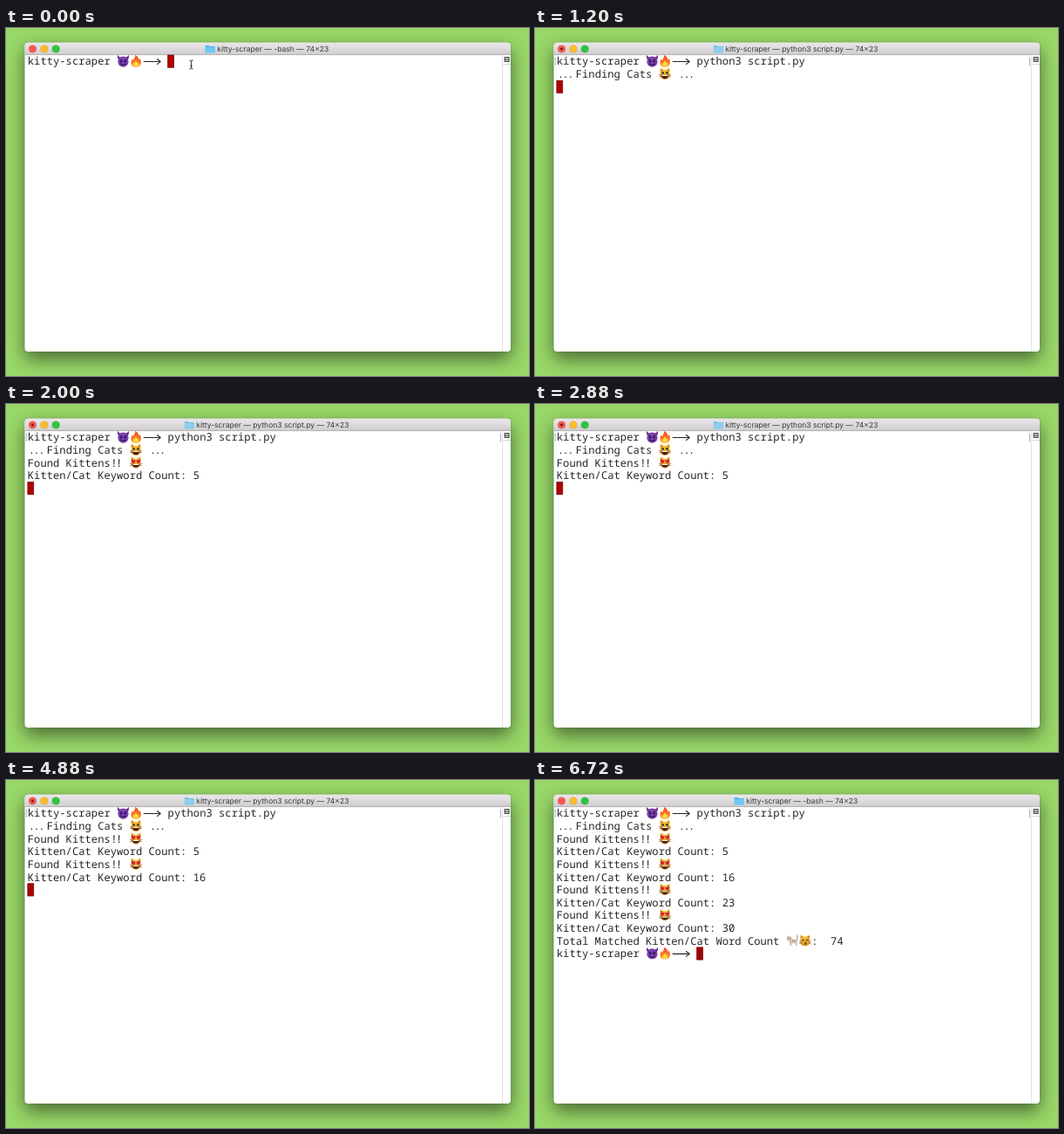
An HTML page that plays this animation: 600 px wide and 399 px high, repeating every 6.76 s.

```html
<!DOCTYPE html>
<html lang="en">
<head>
<meta charset="utf-8">
<title>Terminal session</title>
<style>
  html, body { margin: 0; width: 100%; height: 100%; overflow: hidden; background: #98d768; }
  svg { display: block; width: 100vw; height: 100vh; }
  text { white-space: pre; text-rendering: geometricPrecision; }
  .mono { font: 500 12.18px "Noto Sans Mono", "DejaVu Sans Mono", monospace; fill: #262626; }
  .tight { letter-spacing: -1.6px; }
  .title { font: 8.55px Inter, Roboto, sans-serif; fill: #3a3a3a; }
  .window { filter: drop-shadow(0 8px 10px rgba(0, 0, 0, .45)) drop-shadow(0 0 1px rgba(0, 0, 0, .2)); }
</style>
</head>
<body>
<svg id="stage" viewBox="0 0 600 399" xmlns="http://www.w3.org/2000/svg">
  <defs>
    <linearGradient id="bar" x2="0" y2="1">
      <stop stop-color="#e9e7e9"/><stop offset="1" stop-color="#cfcdcf"/>
    </linearGradient>
    <linearGradient id="flame" x2="0" y2="1">
      <stop stop-color="#f0482b"/><stop offset="1" stop-color="#ff9a1f"/>
    </linearGradient>
    <linearGradient id="fur" x2="0" y2="1">
      <stop stop-color="#f8cc45"/><stop offset="1" stop-color="#d98f1e"/>
    </linearGradient>

    <symbol id="imp" viewBox="0 0 16 16">
      <path d="M1 .7Q.2 5 3 7.2L6 4Q2.5 3.5 1 .7M15 .7Q15.8 5 13 7.2L10 4Q13.5 3.5 15 .7" fill="#5b2a86"/>
      <circle cx="8" cy="9" r="6.7" fill="#7b3fae"/>
      <path d="M3.6 6.3L7 8.2M12.4 6.3L9 8.2" stroke="#2d1147" stroke-width="1.1"/>
      <circle cx="5.5" cy="8.7" r="1.2" fill="#2d1147"/>
      <circle cx="10.5" cy="8.7" r="1.2" fill="#2d1147"/>
      <path d="M4.2 11.3Q8 14.8 11.8 11.3" fill="none" stroke="#2d1147" stroke-width="1.2"/>
    </symbol>

    <symbol id="fire" viewBox="0 0 16 16">
      <path d="M7 .5C11.5 2.5 11.5 5 11.4 6.5Q12.5 6 12.5 4.4C17 10 13.5 15.7 8 15.7S-.2 10.5 3.5 5.5Q4 7 5.2 7.2C4.8 4.5 7.8 3.5 7 .5Z" fill="url(#flame)"/>
      <path d="M8 7C8.2 9.5 10 9.5 10 11Q10.7 10.7 10.8 9.8C13 13 10.5 15.3 8 15.3S3.5 13 5.3 10Q5.8 11 6.7 11C6.3 9 8 8.7 8 7Z" fill="#ffd84a"/>
    </symbol>

    <symbol id="face" viewBox="0 0 16 16">
      <path d="M2.2 .8Q4.8 1.4 6.4 3.2H9.6Q11.2 1.4 13.8 .8Q14.6 4.5 13.8 7.2C15.4 11.5 12.2 15 8 15S.6 11.5 2.2 7.2Q1.4 4.5 2.2 .8Z" fill="url(#fur)"/>
      <path d="M3 2.2L5 3.5L3.2 5.3ZM13 2.2L11 3.5L12.8 5.3Z" fill="#a3641a"/>
      <path d="M.5 9.3L3.4 10M.6 12L3.4 11.5M15.5 9.3L12.6 10M15.4 12L12.6 11.5" stroke="#6e4718" stroke-width=".7"/>
    </symbol>
    <symbol id="grin" viewBox="0 0 16 16">
      <use href="#face"/>
      <ellipse cx="5.4" cy="7.1" rx="1.2" ry="1.6" fill="#33200f"/>
      <ellipse cx="10.6" cy="7.1" rx="1.2" ry="1.6" fill="#33200f"/>
      <path d="M3.6 9.8H12.4Q11.6 14.4 8 14.4T3.6 9.8Z" fill="#45200f"/>
      <path d="M4.3 9.8H11.7L11.3 11H4.7Z" fill="#fff"/>
    </symbol>
    <symbol id="love" viewBox="0 0 16 16">
      <use href="#face"/>
      <path id="heart" d="M4.9 9.4C1.2 7.2 1.9 4.5 3.5 4.5Q4.5 4.5 5 5.6Q5.8 4.5 6.7 4.8C8.2 5.4 7.5 8 4.9 9.4Z" fill="#d3202f"/>
      <use href="#heart" transform="matrix(-1 0 0 1 16 0)"/>
      <path d="M3.7 10.2H12.3Q11.6 14.4 8 14.4T3.7 10.2Z" fill="#45200f"/>
      <path d="M4.4 10.2H11.6L11.2 11.2H4.8Z" fill="#fff"/>
    </symbol>
    <symbol id="kiss" viewBox="0 0 16 16">
      <use href="#face"/>
      <path d="M3.6 8Q5.2 6.2 6.7 8M9.3 8Q10.8 6.2 12.4 8M8 10.4Q10 10.7 8.3 11.7Q10 12.5 8 13" fill="none" stroke="#4a2d12" stroke-width="1.1"/>
      <path d="M7.2 9.3H8.8L8 10.3Z" fill="#b65445"/>
    </symbol>
    <symbol id="cat" viewBox="0 0 16 16">
      <path d="M13 8Q15.8 5 13.7 1.5" fill="none" stroke="#c4a397" stroke-width="1.5" stroke-linecap="round"/>
      <path d="M1.5 1.7L3.2 3H5L6.3 1.7L6.8 5.5Q10 7.2 13.3 6.8Q14.6 8 13.7 10.3L14.3 15H12.3L11.5 11.5H7.3L6.8 15H5L4.2 9.5Q.5 8 1 5Z" fill="#d3c2b6"/>
      <path d="M8 7V9.5M10 7.5V9.7M12 7.5V9.5" stroke="#a28b7e" stroke-width=".8"/>
      <circle cx="2.7" cy="5" r=".6" fill="#433"/><circle cx="5.1" cy="5" r=".6" fill="#433"/>
    </symbol>
  </defs>

  <rect width="600" height="399" fill="#98d768"/>
  <rect class="window" x="21.5" y="16.8" width="557.5" height="354.2" rx="4" fill="#fff"/>
  <path d="M21.5 31V20.8a4 4 0 0 1 4-4H575a4 4 0 0 1 4 4V31Z" fill="url(#bar)"/>
  <path d="M21.5 30.6H579" stroke="#aaa5a9" stroke-width=".8"/>
  <g stroke-width=".5">
    <circle cx="30.5" cy="24" r="4.1" fill="#fb5650" stroke="#d9423c"/>
    <circle cx="43.9" cy="24" r="4.1" fill="#fdbb2f" stroke="#d99b22"/>
    <circle cx="57.2" cy="24" r="4.1" fill="#2bc53f" stroke="#1fa52f"/>
  </g>
  <circle id="busy" cx="30.5" cy="24" r="1.4" fill="#7c0c08"/>
  <path d="M569.5 31V371" stroke="#e2e2e2"/>
  <path d="M570 41.5H579" stroke="#d4d4d4"/>
  <rect x="572.1" y="33.6" width="5" height="4.8" fill="#fff" stroke="#3c3c3c"/>
  <path d="M572 35.2H577M572 36.9H577" stroke="#3c3c3c" stroke-width=".8"/>

  <g id="folder">
    <path d="M.2 1.3Q.2 .3 1.2 .3H4L5.2 1.5H10.3Q11.3 1.5 11.3 2.5V8.7H.2Z" fill="#48b4e6"/>
    <rect x=".2" y="2.4" width="11.1" height="6.6" rx=".7" fill="#6bcaf5"/>
  </g>
  <text id="title" class="title" y="27.2"></text>
  <path id="marks" d="M23.2 33.7V43.3M567.5 33.7V43.3" stroke="#a8a8a8" stroke-width=".9"/>
  <g id="lines"></g>
  <rect id="cursor" width="6.8" height="14.2" fill="#b20000" stroke="#740000" stroke-width=".8"/>
  <path id="pointer" d="M-2-5Q0-5 0-3.6Q0-5 2-5M0-4V4M-2 5Q0 5 0 3.6Q0 5 2 5M-1.2 1.3H1.2" fill="none" stroke="#222" stroke-width=".9"/>
</svg>
<script>
const LOOP = 6760;
const CELL = 7.31, ROW = 14.62, LEFT = 24.8, TOP = 30.85;
const T = { typed: 40, run: 160, find: 440, done: 6720 };
const EMOJI = ['imp', 'fire', 'grin', 'love', 'kiss', 'cat'];
const TIGHT = ['...', '!!'];

const $ = id => document.getElementById(id);
const colX = col => LEFT + col * CELL;
const rowY = row => TOP + row * ROW;
const show = (el, on) => el.setAttribute('visibility', on ? 'visible' : 'hidden');

function add(parent, name, attrs, content = '') {
  const el = document.createElementNS('http://www.w3.org/2000/svg', name);
  for (const key in attrs) el.setAttribute(key, attrs[key]);
  el.textContent = content;
  return parent.appendChild(el);
}

const items = [];

// Lays parts out on the character grid; they appear together at time `at`.
function line(at, row, parts, col = 0) {
  const g = add($('lines'), 'g', {});
  for (const part of parts) {
    const x = colX(col), y = rowY(row);
    if (EMOJI.includes(part)) {
      add(g, 'use', { href: '#' + part, x, y: y - .4, width: 14.6, height: 14.6 });
      col += 2;
      continue;
    }
    if (part === '-->') {
      add(g, 'path', {
        d: `M${x + 1.3} ${y + 7.7}h19.5m-4-3.3l4 3.3l-4 3.3`,
        fill: 'none', stroke: '#262626', 'stroke-width': 1.1
      });
    } else {
      const tight = TIGHT.includes(part);
      add(g, 'text', {
        class: tight ? 'mono tight' : 'mono',
        x: x + (tight ? (part.length - 1) * .5 : 0), y: y + 11.6
      }, part);
    }
    col += part.length;
  }
  items.push({ g, at });
}

const prompt = ['kitty-scraper ', 'imp', 'fire', '-->'];
const finds = [[1400, 5], [3480, 16], [5080, 23], [T.done, 30]];

line(0, 0, prompt);
line(T.typed, 0, ['python3 script.py'], 22);
line(T.find, 1, ['...', 'Finding Cats ', 'grin', ' ', '...']);
finds.forEach(([at, count], i) => {
  line(at, 2 + 2 * i, ['Found Kittens', '!!', ' ', 'love']);
  line(at, 3 + 2 * i, ['Kitten/Cat Keyword Count: ' + count]);
});
line(T.done, 10, ['Total Matched Kitten/Cat Word Count ', 'cat', 'kiss', ':  74']);
line(T.done, 11, prompt);

function cursorCell(t) {
  if (t < T.typed) return [22, 0];
  if (t < T.run) return [39, 0];
  if (t < T.find) return [0, 1];
  if (t >= T.done) return [22, 11];
  return [0, 2 + 2 * finds.filter(([at]) => t >= at).length];
}

function draw(t) {
  const done = t >= T.done;
  const running = t >= T.run && !done;
  for (const { g, at } of items) show(g, t >= at);

  const [col, row] = cursorCell(t);
  $('cursor').setAttribute('x', colX(col) + .1);
  $('cursor').setAttribute('y', rowY(row) + .2);

  $('title').textContent = `kitty-scraper — ${running ? 'python3 script.py' : '-bash'} — 74×23`;
  $('title').setAttribute('x', running ? 218.2 : 242.2);
  $('folder').setAttribute('transform', `translate(${running ? 204.7 : 228.5} 19.6)`);
  $('folder').setAttribute('opacity', running ? .7 : 1);
  show($('busy'), running);
  show($('marks'), t >= T.run);

  show($('pointer'), t < T.typed || done);
  $('pointer').setAttribute('transform', done ? 'translate(189.3 200.5) scale(.8)' : 'translate(212.5 42)');
}

const start = performance.now();
function tick() {
  draw((performance.now() - start) % LOOP);
  requestAnimationFrame(tick);
}
draw(0);
requestAnimationFrame(tick);
</script>
</body>
</html>
```
